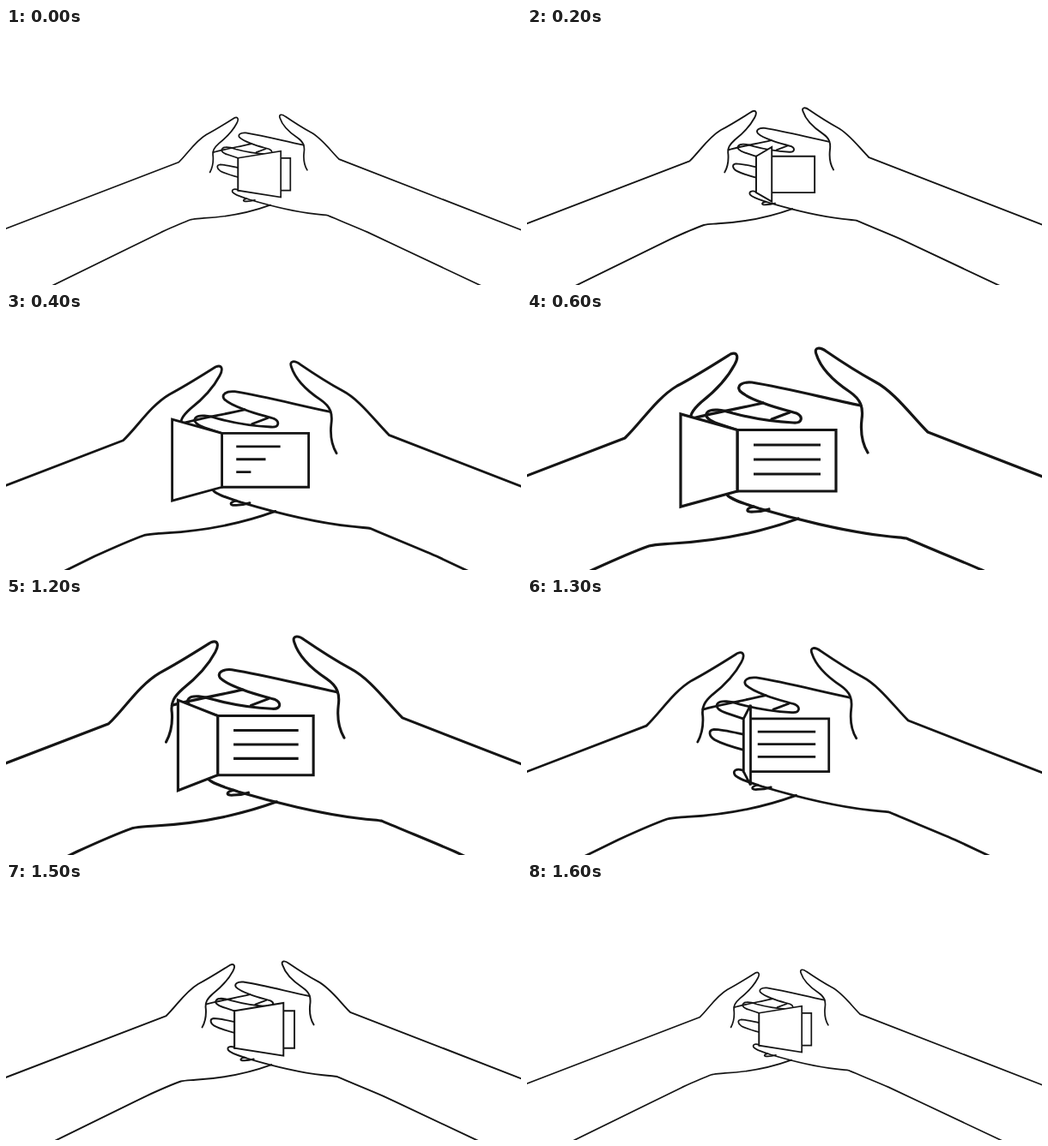
Recreate the animation shown at these times as an HTML page. Size 600x300 px, loop 2.05 s.

```html
<!DOCTYPE html>
<html lang="en">
<head>
<meta charset="utf-8">
<title>Hands opening a card</title>
<style>
  html, body { margin: 0; width: 100%; height: 100%; overflow: hidden; background: #fff; }
  svg { display: block; width: 100%; height: 100%; }
  #scene { fill: none; stroke: #151515; stroke-width: 3.2; }
  .hand { stroke-linecap: round; stroke-linejoin: round; }
  .paper { fill: #fff; }
</style>
</head>
<body>
<svg viewBox="0 0 600 300">
  <g id="scene">
    <g class="hand">
      <!-- left: arm and thumb, index finger, fingertip, underside -->
      <path d="M-341 321L114 146C133 128 150 100 175 85C196 74 218 60 237 48C245 45 247 51 242 60C232 79 217 93 203 104C193 113 188 120 190 133C191 148 188 159 183 168"/>
      <path d="M190 124C210 118 245 112 275 105M285 124L306 116"/>
      <path d="M264 226C255 228 254 233 264 232C270 232 276 231 282 229"/>
      <path d="M-330 497L-160 416L76 300C100 289 125 278 142 272C150 270 158 270 170 269C225 266 275 255 316 240"/>
    </g>
    <g class="hand">
      <!-- right: arm and thumb, upper fingers, third finger, underside -->
      <path d="M917 314L467 139C448 120 428 92 405 80C385 69 368 58 349 45C341 39 334 40 337 48C342 64 358 80 376 92C389 101 392 110 390 124C388 142 391 153 397 163"/>
      <path d="M389 108C345 99 305 88 262 81C250 80 244 85 248 91C254 97 264 101 275 105C290 111 305 114 314 117C322 121 321 129 310 128C290 127 262 123 240 117C228 113 214 111 210 116C206 121 213 126 222 129L246 137"/>
      <path d="M246 158C232 155 216 151 205 151C197 152 198 160 206 165C217 171 231 175 246 179"/>
      <path d="M246 207C236 203 230 206 233 212C237 218 255 223 270 228C310 240 370 255 415 260C432 262 438 262 442 263C470 275 500 287 530 300L930 489"/>
    </g>
    <path class="paper" d="M245 136.5H360V208H245Z"/>
    <path id="text"/>
    <path id="cover" class="paper"/>
  </g>
</svg>
<script>
  const LOOP = 2050, STEP = 50;
  const CENTER = { x: 299, y: 169 };
  const SMALL = 1 / 1.888;
  const HINGE = 245, COVER_SHUT = 94, COVER_OPEN = -66;

  const scene = document.getElementById('scene');
  const text = document.getElementById('text');
  const cover = document.getElementById('cover');

  const ramp = (t, start, end) => Math.min(1, Math.max(0, (t - start) / (end - start)));
  const mix = (a, b, p) => a + (b - a) * p;
  const easeInOut = u => u < 0.5 ? 2 * u * u : 1 - 2 * (1 - u) ** 2;
  const softEase = u => mix(u, u * u * (3 - 2 * u), 0.6);

  function draw(t) {
    const zoom = easeInOut(ramp(t, 65, 588)) - softEase(ramp(t, 1150, 1600));
    const opened = ramp(t, 75, 391) - ramp(t, 1168, 1448);

    const scale = mix(SMALL, 1, zoom);
    scene.setAttribute('transform',
      `translate(${CENTER.x} ${CENTER.y}) scale(${scale}) translate(${-CENTER.x} ${-CENTER.y})`);

    // The free edge looks tallest when it points at the viewer.
    const swing = mix(COVER_SHUT, COVER_OPEN, opened);
    const half = 54.5 - 0.00025 * (swing + 28) ** 2;
    const edge = HINGE + swing;
    cover.setAttribute('d',
      `M${HINGE} 136.5L${edge} ${172 - half}V${172 + half}L${HINGE} 208Z`);

    const rows = [0, 1, 2].map(i => {
      const drawn = opened > 0 ? ramp(t, 250 + 50 * i, 450 + 50 * i) : 0;
      return drawn ? `M264 ${154 + 17 * i}h${78 * drawn}` : '';
    });
    text.setAttribute('d', rows.join(''));
  }

  const begin = performance.now();
  function tick() {
    const t = (performance.now() - begin) % LOOP;
    draw(Math.floor(t / STEP) * STEP);
    requestAnimationFrame(tick);
  }
  tick();
</script>
</body>
</html>
```
